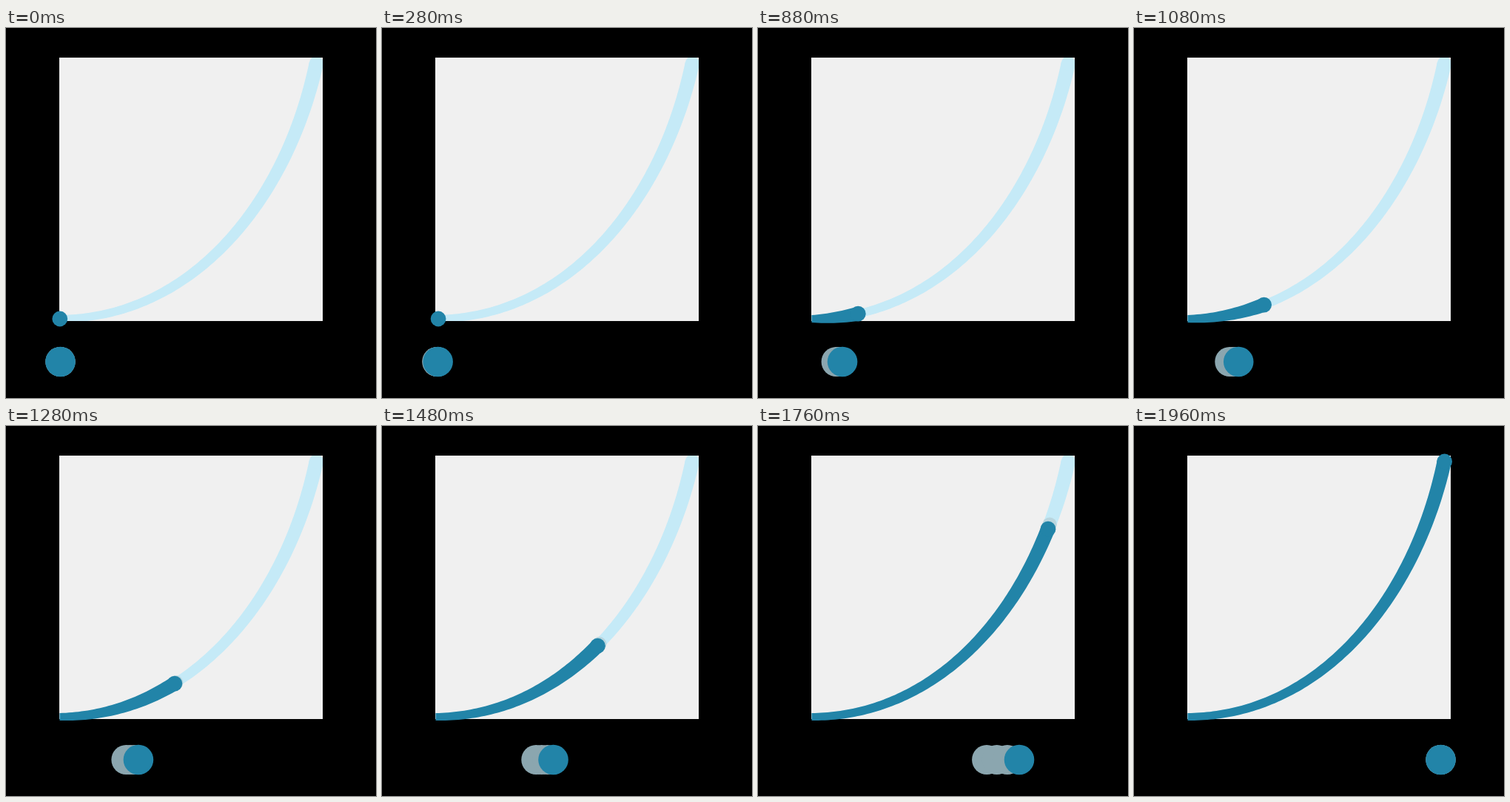
These frames come from a looping animation (500 by 500 pixels, 3 s). An HTML page with a canvas:

```html
<!DOCTYPE html>
<html lang="en">
<head>
<meta charset="utf-8">
<title>Ease-in curve</title>
<style>
  html, body { margin: 0; width: 100%; height: 100%; overflow: hidden; background: #000; }
  canvas { display: block; }
</style>
</head>
<body>
<canvas id="stage" width="500" height="500"></canvas>
<script>
const ctx = document.getElementById('stage').getContext('2d');
const LOOP = 3000, STEP = 40;
const START = 85, DURATION = 1757;
const BLUE = '#2284a8', PALE = '#c5eaf7', PANEL = '#f0f0f0', SHADE = '#b9d6df', ECHO = '#8ba6af';
const PANEL_BOX = [72, 40, 356, 356];

const bezier = (s, a, b, c, d) => {
  const r = 1 - s;
  return r * r * r * a + 3 * r * r * s * b + 3 * r * s * s * c + s * s * s * d;
};

// Progress of the motion: a cubic-bezier easing solved by bisection
function progress(time) {
  const u = Math.min(1, Math.max(0, (time - START) / DURATION));
  if (u === 0 || u === 1) return u;
  let low = 0, high = 1;
  for (let i = 0; i < 30; i++) {
    const mid = (low + high) / 2;
    if (bezier(mid, 0, 0.545, 0.88, 1) < u) low = mid; else high = mid;
  }
  return bezier(low, 0, 0, 0.43, 1);
}

// The graph, measured by arc length
const path = document.createElementNS('http://www.w3.org/2000/svg', 'path');
path.setAttribute('d', 'M72.5 393 C246 393 377.5 241 419.3 48');
const length = path.getTotalLength();
const pointAt = p => path.getPointAtLength(Math.min(1, p) * length);

const SAMPLES = 300;
const spine = Array.from({ length: SAMPLES + 1 }, (_, i) => {
  const p = i / SAMPLES;
  const { x, y } = pointAt(p);
  const before = pointAt(Math.max(0, p - 0.002)), after = pointAt(p + 0.002);
  const dx = after.x - before.x, dy = after.y - before.y, size = Math.hypot(dx, dy);
  return { x, y, nx: -dy / size, ny: dx / size };
});

function spineAt(p) {
  const i = Math.min(SAMPLES - 1, Math.floor(p * SAMPLES)), f = p * SAMPLES - i;
  const a = spine[i], b = spine[i + 1];
  const mix = key => a[key] + (b[key] - a[key]) * f;
  return { x: mix('x'), y: mix('y'), nx: mix('nx'), ny: mix('ny') };
}

function circle(x, y, radius, color) {
  ctx.fillStyle = color;
  ctx.beginPath();
  ctx.arc(x, y, radius, 0, 2 * Math.PI);
  ctx.fill();
}

// A band that widens from its start to the point reached
function band(p, color) {
  const count = Math.max(2, Math.ceil(p * 120));
  const left = [], right = [];
  for (let i = 0; i <= count; i++) {
    const half = 5 + 4.7 * i / count;
    const { x, y, nx, ny } = spineAt(p * i / count);
    left.push([x + nx * half, y + ny * half]);
    right.unshift([x - nx * half, y - ny * half]);
  }
  ctx.fillStyle = color;
  ctx.beginPath();
  [...left, ...right].forEach(([x, y]) => ctx.lineTo(x, y));
  ctx.fill();
}

const ballX = time => 73.5 + 341 * progress(time);

function draw(time) {
  const p = progress(time);
  const tip = pointAt(p), end = pointAt(1);

  ctx.fillStyle = '#000';
  ctx.fillRect(0, 0, 500, 500);
  ctx.fillStyle = PANEL;
  ctx.fillRect(...PANEL_BOX);

  ctx.save();
  ctx.beginPath();
  ctx.rect(...PANEL_BOX);
  ctx.clip();
  band(1, PALE);
  circle(end.x, end.y, 9.7, PALE);
  if (p > 0.3 && p < 1) {
    const ahead = pointAt(p + 8 * p / length);
    circle(ahead.x, ahead.y, 9.7, SHADE);
  }
  ctx.restore();

  if (p > 0) band(p, BLUE);
  circle(tip.x + 0.3, tip.y, 10.4, BLUE);

  for (const lag of [80, 53, 27]) circle(ballX(time - lag), 451, 20, ECHO);
  circle(ballX(time), 451, 20.3, BLUE);
}

const origin = performance.now();
function frame() {
  const time = (performance.now() - origin) % LOOP;
  draw(Math.floor(time / STEP) * STEP);
  requestAnimationFrame(frame);
}
frame();
</script>
</body>
</html>
```
